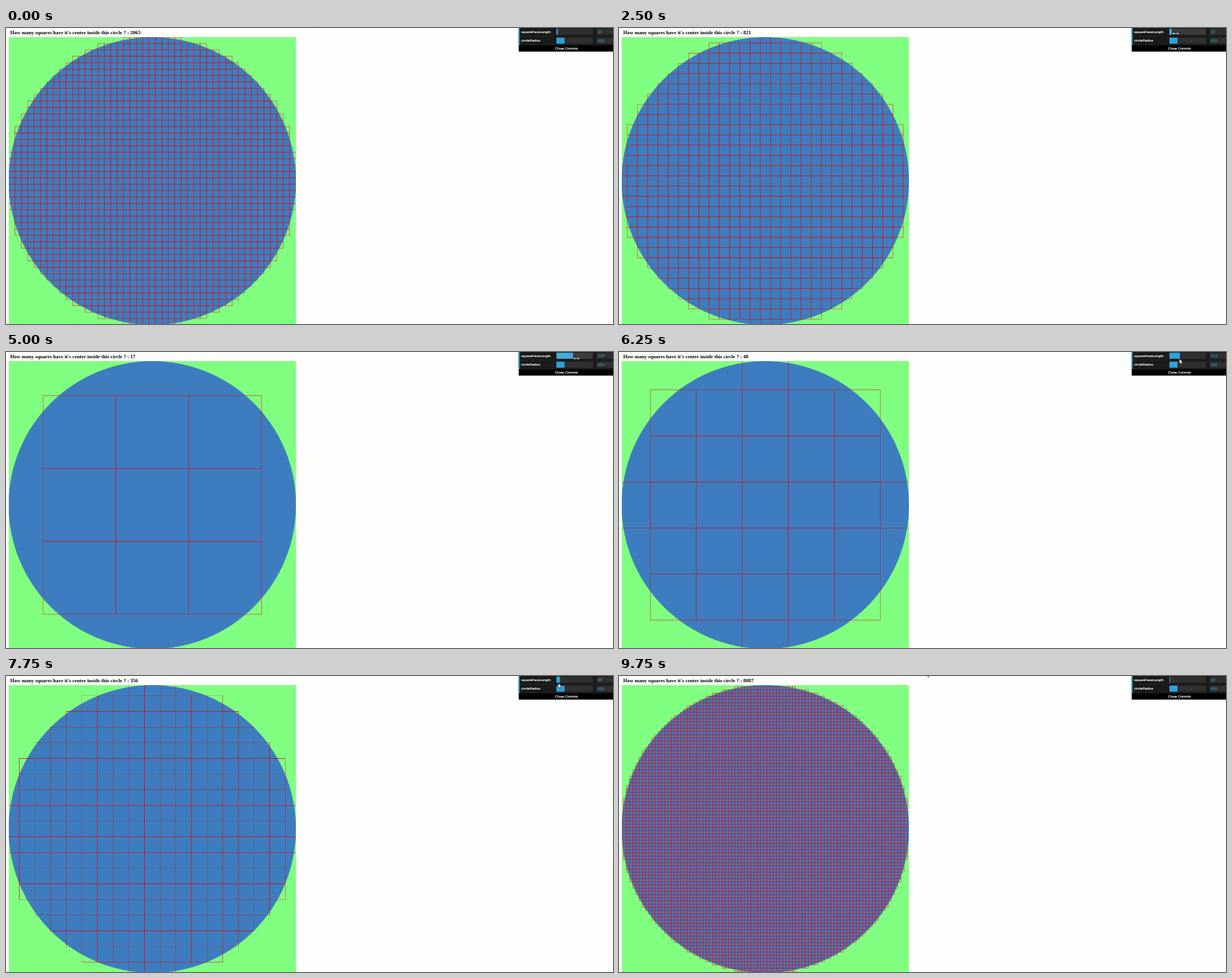
Recreate the animation shown at these times as an HTML page with a canvas. Size 1072 by 522 pixels, loop 10000 ms.

```html
<!DOCTYPE html>
<html lang="en">
<head>
<meta charset="utf-8">
<title>Squares inside a circle</title>
<style>
  html, body { margin: 0; width: 100%; height: 100%; overflow: hidden; background: #fdfdfc; }
  canvas, svg { position: absolute; left: 0; top: 0; width: 1072px; height: 522px; }
  .title { font: bold 9.02px "Liberation Serif", Times, serif; fill: #000; }
  .label { font: 6.2px "Liberation Sans", Arial, sans-serif; fill: #fff; stroke: #fff; stroke-width: .2px; }
  .value { font: 7.33px "Liberation Sans", Arial, sans-serif; fill: #2fa1d6; }
  .track, .field { fill: #303030; }
  .bar { fill: #2fa1d6; }
  .hover .track { fill: #3c3c3c; }
  .hover .bar { fill: #44abda; }
  .cursor { fill: #fff; stroke: #000; stroke-width: 1px; }
</style>
</head>
<body>
<canvas id="stage" width="1072" height="522"></canvas>
<svg viewBox="0 0 1072 522">
  <text class="title" x="7.5" y="11" id="title"></text>

  <rect x="905.5" y="0" width="166.5" height="41.6" fill="#000"/>
  <rect x="905.5" y="0" width="166.5" height="30.3" fill="#1a1a1a"/>
  <path d="M905.5 14.3H1072M905.5 30H1072" stroke="#2c2c2c" stroke-width=".6"/>
  <rect x="905.5" y="0" width="1.8" height="30.3" fill="#2fa1d6"/>

  <g id="size">
    <text class="label" x="910" y="8.6">squareFaceLength</text>
    <rect class="track" x="972" y="1.2" width="64.5" height="10.7"/>
    <rect class="bar" id="bar" x="972" y="1.2" height="10.7"/>
    <rect class="field" x="1043" y="1.2" width="29" height="10.7"/>
    <text class="value" id="value" x="1044.7" y="9.4"></text>
  </g>
  <g>
    <text class="label" x="910" y="24.4">circleRadius</text>
    <rect class="track" x="972" y="17" width="64.5" height="10.7"/>
    <rect class="bar" x="972" y="17" width="14.4" height="10.7"/>
    <rect class="field" x="1043" y="17" width="29" height="10.7"/>
    <text class="value" x="1044.7" y="25.2">450</text>
  </g>
  <text class="label" x="969.6" y="37.8">Close Controls</text>

  <path class="cursor" id="arrow" d="M0 0V16L3.7 12.5L6 18L8.5 17L6.2 11.7H11Z"/>
  <path class="cursor" id="resize" d="M-10 0L-5 -5V-1.3H5V-5L10 0L5 5V1.3H-5V5Z"/>
</svg>
<script>
const LOOP = 10000, STEP = 250, RADIUS = 450, SCALE = 0.564, LEFT = 4.5, TOP = 16;
const el = id => document.getElementById(id);

// Keys: [time, value...]
const sizeKeys = [[0, 20], [1000, 20], [2500, 32], [3500, 128], [5000, 228], [7000, 93], [8250, 19], [8500, 10]];
const cursorKeys = [
  [0, 538, -10], [1000, 982, 9], [2500, 983, 9.7], [3500, 996.5, 9.3], [5000, 1007.5, 11.5],
  [7000, 979, 12], [8250, 973, 13], [8500, 973, 14], [9000, 973, 14],
  [9250, 860, 8], [9500, 680, 0], [9750, 543, -8]
];

// The figure is drawn at full size, then shrunk onto the stage.
const stage = el("stage").getContext("2d");
const figure = document.createElement("canvas");
figure.width = figure.height = 2 * RADIUS;
const pen = figure.getContext("2d");

function sample(keys, t) {
  const i = keys.findIndex(k => k[0] > t);
  if (i < 0) return keys[keys.length - 1].slice(1);
  const a = keys[i - 1], b = keys[i], p = (t - a[0]) / (b[0] - a[0]);
  return a.slice(1).map((v, n) => v + (b[n + 1] - v) * p);
}

// The displayed total counts one quadrant and the axes more than once.
function count(size) {
  const r = RADIUS / size, n = Math.floor(r);
  let k = n;
  for (let i = 1; i <= n; i++) k += Math.floor(Math.sqrt(r * r - i * i));
  return 5 * k + 3 * n + 4 - (r === n ? 2 : 0);
}

function drawFigure(size) {
  const n = Math.floor(RADIUS / size), side = 2 * RADIUS;
  pen.fillStyle = "#80ff80";
  pen.fillRect(0, 0, side, side);
  pen.fillStyle = "#3d7dbf";
  pen.beginPath();
  pen.arc(RADIUS, RADIUS, RADIUS, 0, 2 * Math.PI);
  pen.fill();
  pen.strokeStyle = "#f00000";
  const corner = i => RADIUS + (i - 0.5) * size;
  for (let j = -n; j <= n; j++) {
    for (let i = -n; i <= n; i++) {
      if (Math.hypot(i, j) * size < RADIUS) pen.strokeRect(corner(i), corner(j), size, size);
    }
  }
  stage.clearRect(0, 0, 1072, 522);
  stage.imageSmoothingQuality = "low";
  stage.drawImage(figure, LEFT, TOP, side * SCALE, side * SCALE);
}

function showSize(size) {
  drawFigure(size);
  el("title").textContent = `How many squares have it's center inside this circle ? : ${count(size)}`;
  el("value").textContent = size;
  el("bar").setAttribute("width", 64.5 * size / 500);
}

function showCursor(t) {
  const [x, y] = sample(cursorKeys, t);
  const hover = t >= 1000 && t <= 5500;
  el("size").classList.toggle("hover", hover);
  el("resize").style.display = hover ? "" : "none";
  el("arrow").style.display = hover ? "none" : "";
  el(hover ? "resize" : "arrow").setAttribute("transform", `translate(${x} ${y}) scale(${SCALE})`);
}

let lastStep = -1, lastSize = 0;
function draw(now) {
  const t = Math.floor(now % LOOP / STEP) * STEP;
  if (t === lastStep) return;
  lastStep = t;
  const size = Math.round(sample(sizeKeys, t)[0]);
  if (size !== lastSize) showSize(lastSize = size);
  showCursor(t);
}
function tick() {
  draw(performance.now());
  requestAnimationFrame(tick);
}
tick();
</script>
</body>
</html>
```
